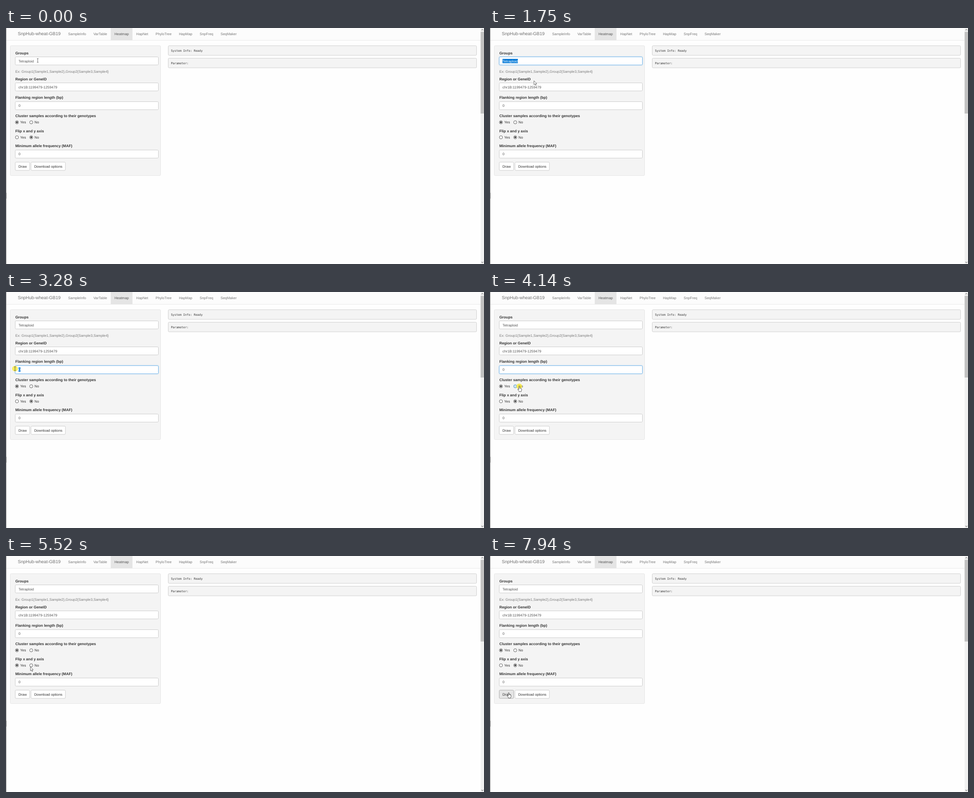
An HTML page that plays this animation: 1062x527 px, repeating every 8 s.

```html
<!DOCTYPE html>
<html lang="en">
<head>
<meta charset="utf-8">
<title>Heatmap</title>
<style>
html, body { margin: 0; width: 100%; height: 100%; overflow: hidden; background: #fefefe; }
svg { display: block; width: 1062px; height: 527px; }
text { font: 7.88px "Liberation Sans", Arial, sans-serif; fill: #333; white-space: pre; text-rendering: geometricPrecision; }
.nav { fill: #777; }
.on { fill: #555; }
.brand { font-size: 10px; fill: #707070; }
.label { font-size: 8.25px; font-weight: bold; }
.help { fill: #7a7a7a; }
.value { fill: #555; }
.mono { font: 6.5px "DejaVu Sans Mono", monospace; }
.picked { fill: #fff; }
.glow { fill: #fff; stroke: #74b6eb; filter: drop-shadow(0 0 1.5px rgba(102, 175, 233, .45)); }
</style>
</head>
<body>
<svg id="stage" viewBox="0 0 1062 527"></svg>
<script>
const LOOP = 8000;
const LEFT = 20.5;
const stage = document.getElementById('stage');

function add(tag, attrs, parent = stage) {
  const el = document.createElementNS('http://www.w3.org/2000/svg', tag);
  for (const k in attrs) el.setAttribute(k, attrs[k]);
  parent.appendChild(el);
  return el;
}
const set = (el, k, v) => el.setAttribute(k, v);
const show = (el, on) => set(el, 'visibility', on ? 'visible' : 'hidden');
const clamp = v => Math.max(0, Math.min(1, v));
const snap = y => Math.round(y - 9.5) + .5;

function box(x, y, width, height, fill, stroke = 'none', rx = 0) {
  return add('rect', { x, y, width, height, fill, stroke, rx });
}
function text(str, x, mid, cls = '') {
  const el = add('text', { x, y: mid + 2.75, class: cls });
  el.textContent = str;
  return el;
}

// Navigation bar
function navBar() {
  box(0, 0, 1054, 27, '#fcfcfc');
  box(0, 27, 1054, 1, '#e9e9e9');
  const tab = box(0, 0, 0, 27, '#e5e5e5');
  text('SnpHub-wheat-GB19', 26.3, 13.6, 'brand');
  const pad = 8.15;
  let x = 138;
  for (const s of 'SampleInfo VarTable Heatmap HapNet PhyloTree HapMap SnpFreq SeqMaker'.split(' ')) {
    const on = s === 'Heatmap';
    const w = text(s, x, 13, on ? 'on' : 'nav').getComputedTextLength();
    if (on) {
      set(tab, 'x', x - pad);
      set(tab, 'width', w + 2 * pad);
    }
    x += w + 2 * pad;
  }
}

// Window edge and scrollbar
function frame() {
  box(0, 0, 1, 527, '#9a9a9a');
  box(0, 368, 1, 13, '#555');
  box(1054.5, 0, 7.5, 527, '#f1f1f1');
  box(1054.5, 8.5, 7.5, 182.5, '#c1c1c1');
  add('path', { d: 'M1056.2 5.3l2.2-2.4 2.2 2.4M1056.2 522l2.2 2.4 2.2-2.4', fill: 'none', stroke: '#505050' });
}

function output(str, mid) {
  box(360.5, mid - 10.7, 685, 21.4, '#f4f4f4', '#cfcfcf', 2);
  text(str, 366.4, mid - .4, 'mono');
}

// The form is laid out in page units, zoomed out to the stage
let flow = 0;
function block(height, gap) {
  const mid = 50.3 + (flow + height / 2) * .5585;
  flow += height + gap;
  return mid;
}
const label = s => text(s, LEFT + .2, block(20, 5), 'label');

function field(title, str) {
  label(title);
  const mid = block(34, 15), y = snap(mid);
  const rect = { x: LEFT, y, width: 318, height: 18, rx: 2 };
  add('rect', { ...rect, fill: '#fff', stroke: '#ccc' });
  const glow = add('rect', { ...rect, class: 'glow' });
  const mark = box(0, mid - 4.8, 0, 9.6, '#0078d7');
  const el = text('', 27.8, mid, 'value');
  const head = add('tspan', {}, el);
  const tail = add('tspan', { class: 'picked' }, el);
  head.textContent = str;
  const edges = [...str].map((_, i) => el.getStartPositionOfChar(i).x);
  edges.push(27.8 + el.getComputedTextLength());
  return { str, mid, glow, mark, head, tail, edges };
}

function radios(title, first) {
  label(title);
  const y = block(20, 15);
  const items = ['Yes', 'No'].map((s, i) => {
    const x = LEFT + 3.8 + i * 31.8;
    const ring = add('circle', { cx: x, cy: y, r: 3.5, 'stroke-width': .8 });
    const dot = add('circle', { cx: x, cy: y, r: 2, fill: '#333' });
    const el = text(s, x + 7.2, y);
    return { ring, dot, from: x + 3.8, to: x + 7.2 + el.getComputedTextLength() + 2 };
  });
  return { y, first, items };
}

function button(s, x, width, mid) {
  const el = box(x, snap(mid), width, 18.5, '#fff', '#ccc', 2);
  text(s, x + 7.2, mid);
  return el;
}

navBar();
frame();
output('System Info: Ready', 50.3);
output('Parameter:', 78.2);
box(9.5, 39.5, 334, 290, '#f4f4f4', '#e5e5e5', 2);
const groups = field('Groups', 'Tetraploid');
text('Ex: Group1{Sample1,Sample2},Group2{Sample3,Sample4}', LEFT + .2, block(20, 10), 'help');
const region = field('Region or GeneID', 'chr1B:1199479-1259479');
const flank = field('Flanking region length (bp)', '0');
const cluster = radios('Cluster samples according to their genotypes', 0);
const flip = radios('Flip x and y axis', 1);
const maf = field('Minimum allele frequency (MAF)', '0');
const buttonMid = block(34, 0);
const draw = button('Draw', LEFT, 32, buttonMid);
button('Download options', 55.5, 76.5, buttonMid);
const fields = [groups, region, flank, maf];
const rows = [cluster, flip];

// Pointer
const halo = add('circle', { r: 6.2, fill: '#fae81c', 'fill-opacity': .7 });
const pointer = add('g', {});
const shape = (d, fill, stroke, w) =>
  add('path', { d, fill, stroke, 'stroke-width': w, 'stroke-linejoin': 'round' }, pointer);
const shapes = {
  beam: shape('M-1.8-4.2H1.8M0-4.2V4.2M-1.8 4.2H1.8', 'none', '#444', .75),
  arrow: shape('M0 0V9L2.1 7 3.6 10.3 5 9.7 3.6 6.5H6.3Z', '#fff', '#333', .7),
  hand: shape('M-1 .8A1 1 0 0 1 1 .8V4.2Q2 3.8 2.6 4.6 3.6 4.2 4.1 5 5.3 4.8 5.3 6V8.3Q5.2 9.6 4.3 10.4' +
    'V11.8H-.6V10.8Q-2 9-3.2 7.1-3.3 5.8-1.9 6.3L-1 7.2Z', '#fff', '#222', .75)
};

// Pointer moves: start, end, place reached
const moves = [
  [430, 860, 19.5, groups.mid - 4],
  [1320, 2110, 118, region.mid - 1.5],
  [2110, 2455, 14, region.mid - 5],
  [2550, 2970, 38, flank.mid - 3],
  [3090, 3250, 20, flank.mid - 2],
  [3400, 3900, 65, cluster.y],
  [4260, 4500, 36, cluster.y],
  [4700, 5030, 35, flip.y + 4],
  [5300, 5520, 54.3, flip.y + 3.4],
  [5580, 5700, 68, flip.y + 3],
  [5890, 6330, 40, maf.mid + 1.5],
  [6400, 6830, 16, maf.mid + 3],
  [7070, 7510, 41.5, buttonMid - 3.5]
];

// Presses: start, time held, what is pressed and which choice
const presses = [
  [370, 760, groups], [2110, 450, region], [3090, 310, flank],
  [4080, 180, cluster, 1], [4560, 120, cluster, 0],
  [5200, 130, flip, 0], [5760, 120, flip, 1],
  [6330, 550, maf], [7820, 110, draw]
].map(([at, hold, on, choice]) => ({ at, end: at + hold, on, choice }));

function pointerAt(t) {
  let x = 70.5, y = groups.mid - 1.3;
  for (const [start, end, toX, toY] of moves) {
    const k = 1 - (1 - clamp((t - start) / (end - start))) ** 2;
    x += (toX - x) * k;
    y += (toY - y) * k;
  }
  return [x, y];
}

// Index of the radio label below the point, or -1
const labelAt = (x, y, r) =>
  Math.abs(y - r.y) > 5 ? -1 : r.items.findIndex(o => x > o.from && x < o.to);
const overDraw = (x, y) => x > LEFT && x < 52.5 && Math.abs(y - buttonMid) < 9.5;

function kindAt(x, y) {
  if (fields.some(f => x > 12 && Math.abs(y - f.mid) < 9.5)) return 'beam';
  return overDraw(x, y) || rows.some(r => labelAt(x, y, r) >= 0) ? 'hand' : 'arrow';
}

// A field keeps focus until the next press; dragging selects back from the end
function paintField(f, t) {
  const i = presses.findIndex(p => p.on === f);
  const press = presses[i], next = presses[i + 1].at;
  const fade = s => clamp((t - s) / 60);
  set(f.glow, 'opacity', fade(press.at) * (1 - fade(next + 60)));
  const n = f.str.length;
  let from = n;
  if (t >= press.at && t < next) {
    const x = pointerAt(Math.max(press.at, Math.min(t, press.end) - 35))[0];
    from = 0;
    while (from < n && x > (f.edges[from] + f.edges[from + 1]) / 2) from++;
  }
  f.head.textContent = f.str.slice(0, from);
  f.tail.textContent = f.str.slice(from);
  set(f.mark, 'x', f.edges[from]);
  set(f.mark, 'width', f.edges[n] - f.edges[from]);
}

function paintRow(r, t, x, y, down) {
  const last = presses.filter(p => p.on === r && t >= p.end).pop();
  const chosen = last ? last.choice : r.first;
  const hover = labelAt(x, y, r);
  r.items.forEach(({ ring, dot }, i) => {
    show(dot, i === chosen);
    set(ring, 'stroke', i === hover ? '#2f7fb8' : '#333');
    set(ring, 'fill', i === hover && down ? '#cfe4f2' : '#fff');
  });
}

function paint(t) {
  const [x, y] = pointerAt(t);
  const down = presses.some(p => t >= p.at && t < p.end);
  fields.forEach(f => paintField(f, t));
  rows.forEach(r => paintRow(r, t, x, y, down));
  const hot = overDraw(x, y);
  set(draw, 'fill', hot ? '#e6e6e6' : '#fff');
  set(draw, 'stroke', hot ? '#adadad' : '#ccc');

  const at = `translate(${x} ${y})`;
  set(pointer, 'transform', at);
  set(halo, 'transform', at);
  show(halo, down);
  const kind = kindAt(x, y);
  for (const k in shapes) show(shapes[k], k === kind);
}

const start = performance.now();
function tick() {
  paint((performance.now() - start) % LOOP);
  requestAnimationFrame(tick);
}
tick();
</script>
</body>
</html>
```
